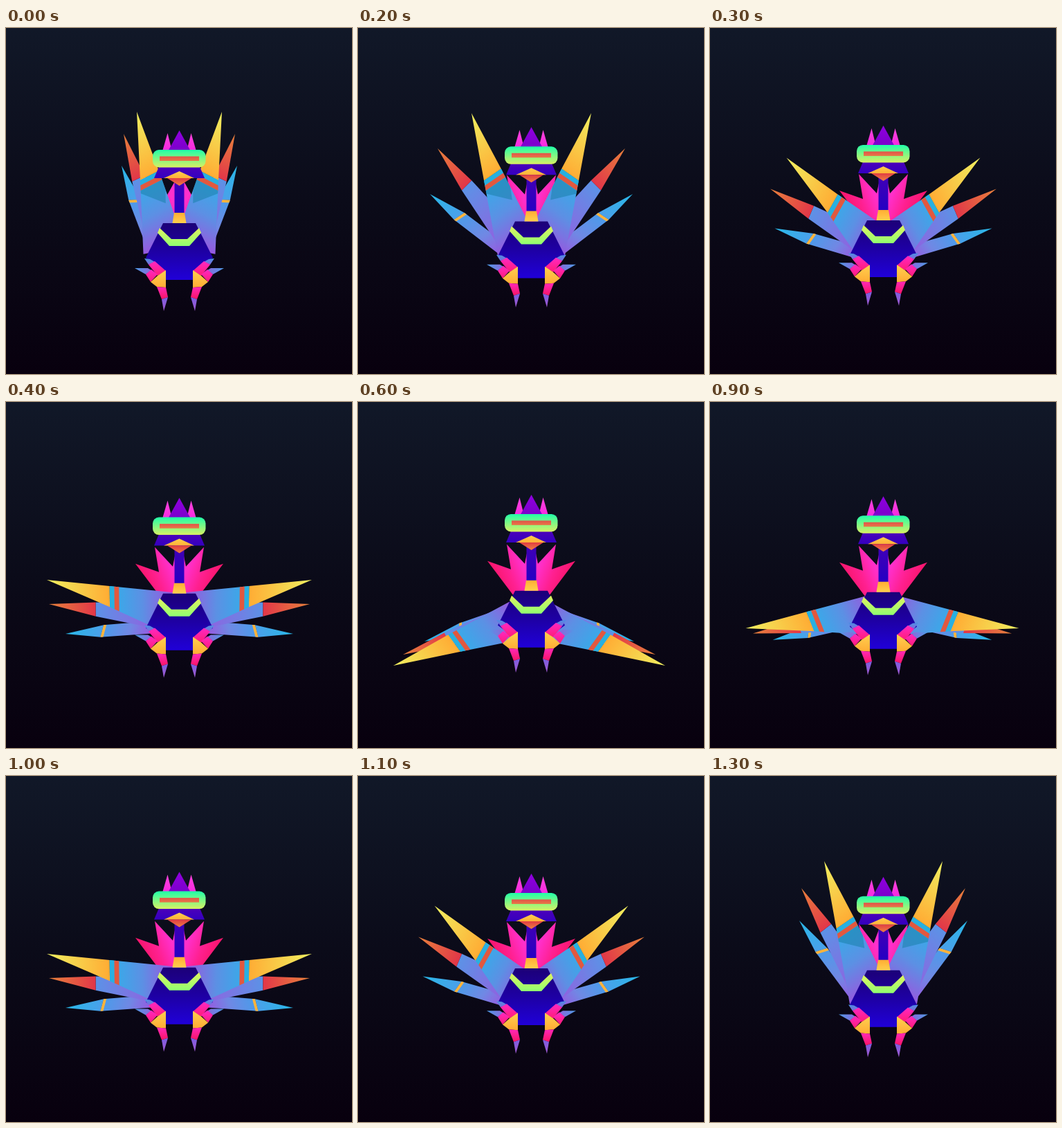
These frames come from a looping animation (500x500 px, 1400 ms). An HTML page with a canvas:

```html
<!DOCTYPE html>
<html>
<head>
<meta charset="utf-8">
<style>
html, body { margin: 0; height: 100%; overflow: hidden; background: #0b0b18; }
canvas { display: block; width: 100vw; height: 100vh; }
</style>
</head>
<body>
<canvas id="stage" width="500" height="500"></canvas>
<script>
const ctx = document.getElementById('stage').getContext('2d');
const AXIS = 501;                 // x + mirrored x
const TIMES = [0, 1, 2, 4, 6];    // steps at which the tips pass their path points

// A feather is a rigid blade pointing from its tip path to its root.
// edge: where the coloured tip ends; w, rootW: half widths there and at the root;
// slant: lean of the stripes; drop: root travel per step late in the stroke
const FEATHERS = [
  { path: [[167, 199], [129, 209], [104, 240], [86, 335], [96, 346]], root: [216, 325], drop: -10,
    edge: 53, w: 8.5, rootW: 9, slant: -.35, bands: [[0, 4, '#ffb43c']],
    tip: ['#28b8e8', '#4aa0ea'], vane: ['#4a9cea', '#7088e4', '#a04ee0'] },
  { path: [[170, 153], [132, 162], [115, 174], [62, 292], [65, 365]], root: [222, 310], drop: 0,
    edge: 68, w: 10, rootW: 20, slant: .12, bands: [],
    tip: ['#e8823c', '#e23648'], vane: ['#5c92e6', '#7f72e2', '#a848de'] },
  { path: [[189, 121], [165, 123], [164, 123], [59, 257], [51, 381]], root: [225, 301], drop: 8,
    edge: 94, w: 14.5, rootW: 31, slant: .28, bands: [[0, 7, '#28b0e0'], [7, 7, '#e2583e']], shade: true,
    tip: ['#f0f060', '#ffac34'], vane: ['#30b0ea', '#5c90e4', '#a050de'] }
];

// Smooth curve through the path points, running on a little past the last one
function at(v, s) {
  const last = TIMES.length - 1;
  if (s > 6) return v[last] + (v[last] - v[last - 1]) * .12;
  let i = 0;
  while (i < last - 1 && s > TIMES[i + 1]) i++;
  const h = TIMES[i + 1] - TIMES[i], u = (s - TIMES[i]) / h;
  const slope = k => k === 0 || k === last ? 0 : .5 * (v[k + 1] - v[k - 1]) / (TIMES[k + 1] - TIMES[k - 1]);
  const d = v[i + 1] - v[i], a = slope(i) * h - d, b = d - slope(i + 1) * h;
  return v[i] + u * d + u * (1 - u) * (a * (1 - u) + b * u);
}

const late = s => Math.max(0, s - 4);

function gradient(x0, y0, x1, y1, colors) {
  const g = ctx.createLinearGradient(x0, y0, x1, y1);
  colors.forEach((c, i) => g.addColorStop(i / (colors.length - 1), c));
  return g;
}

function trace(p) {
  ctx.beginPath();
  for (let i = 0; i < p.length; i += 2) ctx.lineTo(p[i], p[i + 1]);
  ctx.closePath();
}

function poly(p, fill) {
  trace(p);
  ctx.fillStyle = fill;
  ctx.fill();
}

// Polygon with a vertical gradient
function shape(p, ...colors) {
  const ys = p.filter((_, i) => i % 2);
  poly(p, gradient(0, Math.min(...ys), 0, Math.max(...ys), colors));
}

function moved(x, y, draw) {
  ctx.save();
  ctx.translate(x, y);
  draw();
  ctx.restore();
}

// Draws the left side, then its mirror image moved inwards by lag
function mirrored(draw, lag = 0) {
  draw();
  ctx.save();
  ctx.translate(AXIS - lag, 0);
  ctx.scale(-1, 1);
  draw();
  ctx.restore();
}

function feather(f, s) {
  const x = at(f.path.map(p => p[0]), s), y = at(f.path.map(p => p[1]), s);
  const dx = f.root[0] - x, dy = f.root[1] + f.drop * late(s) - y;
  const { edge, w, rootW } = f, end = Math.hypot(dx, dy) + (rootW > 10 ? 20 : 4);
  const strip = (from, size, fill) => {
    ctx.fillStyle = fill;
    ctx.fillRect(from, -60, size, 120);
  };
  moved(x, y, () => {
    ctx.rotate(Math.atan2(dy, dx));
    trace([0, 0, edge - f.slant * w, -w, end, -rootW, end, rootW, edge + f.slant * w, w]);
    ctx.clip();
    ctx.transform(1, 0, f.slant, 1, 0, 0);
    strip(edge, 200, gradient(edge, 0, end, 0, f.vane));
    if (f.shade && s < 3) poly([edge + 14, -22, edge + 14, 22, edge + 48, -15], 'rgba(30,130,175,.6)');
    strip(-40, edge + 40, gradient(0, 0, edge, 0, f.tip));
    f.bands.forEach(([d, size, color]) => strip(edge + d, size, color));
  });
}

function fan(s) {
  const k = Math.min(s / 2, 1);
  poly([187, 239, 221, 251, 215, 215, 232 + 9 * k, 243, 246, 218, 251, 218, 251, 288, 224, 288],
    gradient(190, 250, 234, 232, ['#f81468', '#ff2090', '#ff30cc']));
}

function leg() {
  shape([200, 333, 208, 334, 215, 338, 206, 342], '#4a90e4', '#8068dc');
  shape([206, 342, 215, 337, 231, 351, 219, 358], '#ff28c4', '#ff1c78');
  poly([186, 347, 205, 347, 210, 350, 202, 356], gradient(186, 0, 210, 0, ['#4c9ce6', '#8a68dc']));
  shape([202, 356, 210, 349, 219, 356, 209, 367], '#ff28c4', '#ff1c78');
  shape([209, 367, 219, 358, 231, 350, 231, 375, 218, 374], '#ffd050', '#ffac34');
  shape([218, 374, 231, 375, 234, 389, 225, 392], '#ff28b8', '#fa1464');
  shape([225, 392, 234, 389, 228, 409], '#7c5ee0', '#a058d0');
}

function body() {
  shape([227, 282, 274, 282, 299, 332, 270, 353, 270, 364, 231, 364, 231, 353, 202, 332], '#1c0078', '#1e00a4', '#2000d8');
  shape([222, 289, 239, 305, 262, 305, 279, 289, 282, 296, 265, 315, 236, 315, 219, 296], '#e0f460', '#90ff70');
}

function head() {
  mirrored(() => shape([233.5, 152, 240, 178, 226, 178], '#ff44dc', '#f428e0'));
  shape([250.5, 148, 268, 180, 233, 180], '#9000e0', '#7800c8');
  shape([222, 198, 279, 198, 287, 217, 214, 217], '#5000b8', '#3400c0');
  shape([228, 217, 250.5, 207, 272, 217], '#ffd04c', '#ffb038');
  shape([233, 217, 268, 217, 250.5, 228], '#e03c44', '#f08040');
  ctx.fillStyle = gradient(0, 176, 0, 202, ['#20ffa8', '#80f884', '#dcf062']);
  ctx.beginPath();
  ctx.roundRect(212, 176, 76.5, 25.5, 9);
  ctx.fill();
  ctx.fillStyle = gradient(0, 185, 0, 192, ['#e0504a', '#e87846']);
  ctx.fillRect(222, 185.5, 57, 6.5);
}

function draw(s) {
  const bodyY = -1.3 * s - .7 * late(s), headY = -2.35 * s, legY = -2.6 * s - 1.2 * late(s);
  ctx.fillStyle = gradient(0, 0, 0, 500, ['#111828', '#0b0b19', '#08000e']);
  ctx.fillRect(0, 0, 500, 500);
  moved(0, bodyY, () => mirrored(() => fan(s)));
  mirrored(() => FEATHERS.forEach(f => feather(f, s)), 3 * late(s));
  shape([243.5, 215 + headY, 257.5, 215 + headY, 257.5, 270 + bodyY, 243.5, 270 + bodyY], '#4400b4', '#2400c4');
  moved(0, bodyY, () => {
    body();
    shape([243, 267, 258, 267, 260.5, 282, 240.5, 282], '#ffac34', '#ffd04c');
  });
  moved(0, headY, head);
  moved(0, legY, () => mirrored(leg));
}

function tick() {
  const step = Math.floor(performance.now() % 1400 / 100);
  draw(Math.min(step, 14 - step));
  requestAnimationFrame(tick);
}
tick();
</script>
</body>
</html>
```
